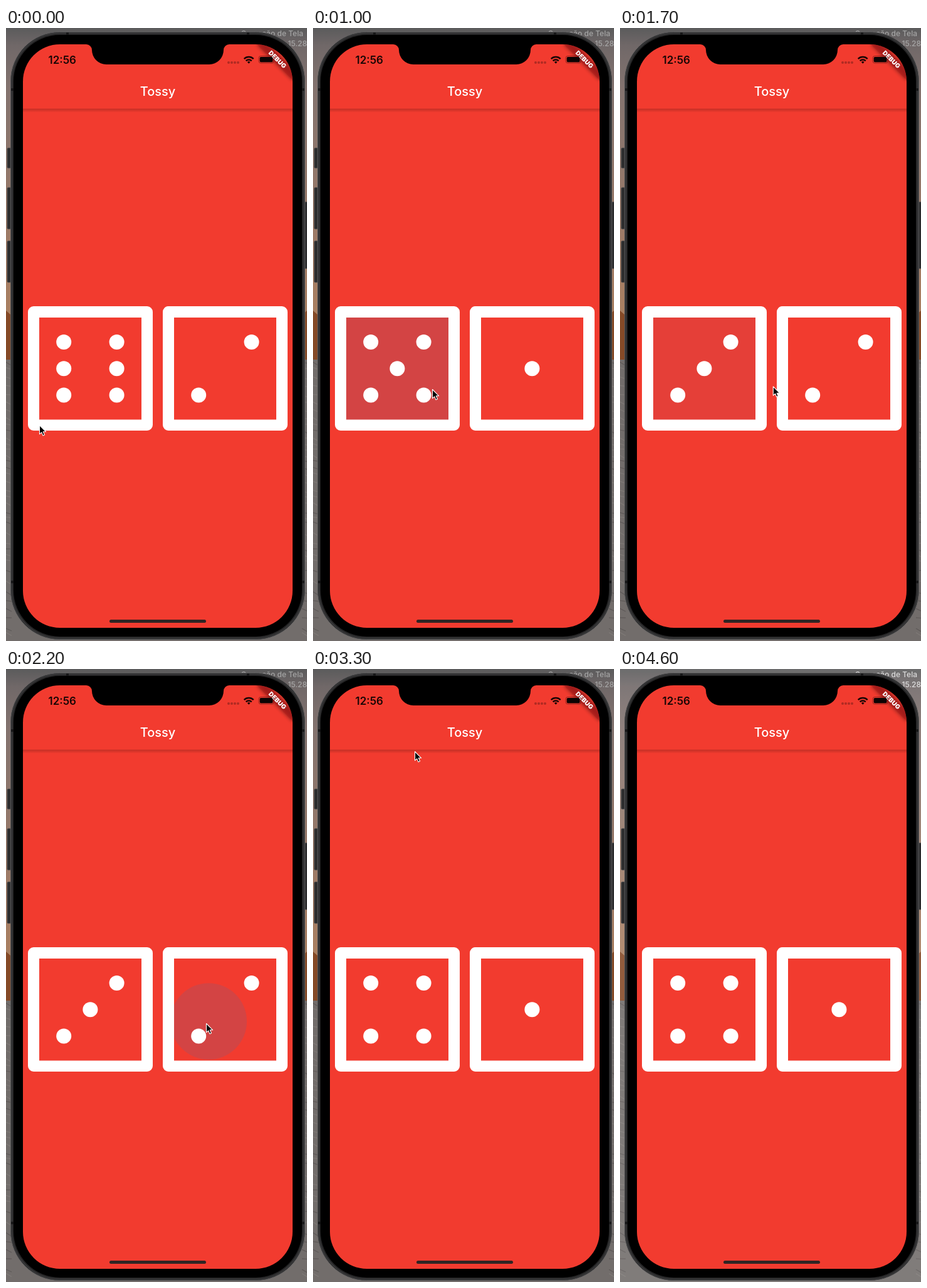
Recreate the animation shown at these times as an HTML page. Size 480 by 976 pixels, loop 4.7 s.

```html
<!DOCTYPE html>
<html lang="en">
<head>
<meta charset="utf-8">
<title>Dice app</title>
<style>
  html, body { margin: 0; width: 100%; height: 100%; overflow: hidden; background: #6b6563; }
  svg { display: block; width: 480px; height: 976px; }
  text { font-family: Inter, Roboto, sans-serif; }
</style>
</head>
<body>
<svg id="stage" viewBox="0 0 480 976" xmlns="http://www.w3.org/2000/svg">
  <defs>
    <linearGradient id="sky" x1="0" y1="0" x2="0" y2="1">
      <stop offset="0" stop-color="#5b5b5c"/>
      <stop offset=".06" stop-color="#706868"/>
      <stop offset=".2" stop-color="#83736f"/>
      <stop offset=".45" stop-color="#8f776c"/>
      <stop offset=".8" stop-color="#a27c65"/>
      <stop offset="1" stop-color="#aa8061"/>
    </linearGradient>
    <linearGradient id="barShade" x1="0" y1="0" x2="0" y2="1">
      <stop offset="0" stop-color="#000" stop-opacity=".2"/>
      <stop offset="1" stop-color="#000" stop-opacity="0"/>
    </linearGradient>
    <filter id="blur" x="-20%" y="-80%" width="140%" height="260%"><feGaussianBlur stdDeviation="3"/></filter>
    <clipPath id="screen"><rect x="27" y="26" width="430" height="929" rx="59"/></clipPath>
    <clipPath id="leftDie"><rect x="35" y="443" width="199" height="198" rx="9"/></clipPath>
    <clipPath id="rightDie"><rect x="250" y="443" width="199" height="198" rx="9"/></clipPath>
  </defs>

  <!-- desktop -->
  <rect width="480" height="460" fill="url(#sky)"/>
  <path d="M0 450L8 457V530H0zM480 450L472 457V530H480z" fill="#854a27"/>
  <rect y="528" width="480" height="448" fill="#726d6b"/>
  <g id="rock" stroke-width="1.2" fill="none"></g>
  <rect id="light" width="480" height="976" fill="#fff" opacity="0"/>
  <g id="label" fill="#a5a5a5" font-size="12" font-weight="500" text-anchor="end">
    <text x="474" y="13">Gravação de Tela</text>
    <text x="480" y="28.5">15.28</text>
  </g>

  <!-- phone body -->
  <g fill="#2d2d2e" stroke="#505051" stroke-width=".8">
    <rect x="2" y="191" width="8" height="32" rx="1.5"/>
    <rect x="2" y="254" width="8" height="66" rx="1.5"/>
    <rect x="2" y="339" width="8" height="66" rx="1.5"/>
    <rect x="475" y="277" width="7" height="106" rx="1.5"/>
  </g>
  <rect x="7.5" y="6.5" width="469" height="967" rx="78" fill="#262627" stroke="#59595a"/>
  <rect x="9.5" y="8.5" width="465" height="963" rx="76" fill="none" stroke="#3b3b3c" stroke-width="1.5"/>
  <path d="M8 98h4M472 98h4M8 882h4M472 882h4M98 7v4M386 7v4" stroke="#171718" stroke-width="4"/>
  <rect x="12" y="11" width="460" height="958" rx="74" fill="#000"/>

  <g clip-path="url(#screen)">
    <rect x="27" y="26" width="430" height="929" fill="#f23b2f"/>
    <rect x="27" y="128.5" width="430" height="6" fill="url(#barShade)"/>
    <text x="242" y="108" font-size="20" font-weight="500" fill="#fff" text-anchor="middle">Tossy</text>
    <circle id="ripple" fill="#217bc0"/>
    <g id="dice" fill="#fff"></g>
    <g transform="translate(457 26) rotate(45)">
      <rect x="-40" y="28" width="80" height="12" fill="#000" opacity=".5" filter="url(#blur)"/>
      <rect x="-40" y="28" width="80" height="12" fill="#b71c1c" opacity=".63"/>
      <text x="0" y="37.6" font-size="10" font-weight="900" fill="#fff" text-anchor="middle">DEBUG</text>
    </g>
    <rect x="165" y="942" width="154" height="5" rx="2.5" fill="#302524"/>
  </g>
  <path d="M128 25H356V26A9 9 0 0 0 347 35A23 23 0 0 1 324 58H160A23 23 0 0 1 137 35A9 9 0 0 0 128 26z" fill="#000"/>

  <!-- status bar -->
  <g fill="#1a0605">
    <text x="67.5" y="56.5" font-size="17" font-weight="600">12:56</text>
    <g opacity=".3">
      <circle cx="355" cy="55" r="2"/><circle cx="360" cy="55" r="2"/>
      <circle cx="365" cy="55" r="2"/><circle cx="370" cy="55" r="2"/>
    </g>
    <g fill="none" stroke="#1a0605" stroke-width="2.5">
      <path d="M379.7 49.2a10.6 10.6 0 0 1 15 0"/>
      <path d="M382.7 52.3a6.4 6.4 0 0 1 9 0"/>
    </g>
    <path d="M384.9 54.2a3.2 3.2 0 0 1 4.6 0L387.2 56.7z"/>
    <rect x="403" y="44.5" width="24" height="11.5" rx="3.4" fill="none" stroke="#1a0605" stroke-opacity=".4"/>
    <rect x="404.6" y="46" width="20.8" height="8.5" rx="2" fill="#0c0303"/>
  </g>

  <path id="cursor" d="M.5 .5V14.7L3.7 11.8 5.9 16.9 8.5 15.8 6.3 10.8H10.7z"
    fill="#000" stroke="#fff" stroke-width="1.1" stroke-linejoin="round"/>
</svg>

<script>
const LOOP = 4700, STEP = 100, FOCUS_AT = 4000;
const $ = id => document.getElementById(id);
const lerp = (a, b, k) => a + (b - a) * k;
const clamp = v => Math.max(0, Math.min(1, v));

// cubic-bezier(.25, .1, .25, 1)
function ease(x) {
  const bez = (a, b, u) => 3 * a * u * (1 - u) ** 2 + 3 * b * u * u * (1 - u) + u ** 3;
  let lo = 0, hi = 1;
  for (let i = 0; i < 24; i++) {
    const mid = (lo + hi) / 2;
    if (bez(.25, .25, mid) < x) lo = mid; else hi = mid;
  }
  return bez(.1, 1, lo);
}
const smooth = x => x * x * (3 - 2 * x);

// [time, x, y]
const path = [
  [0, 53, 632], [100, 53, 632], [600, 190, 575], [1500, 190, 575],
  [1950, 319, 564], [2850, 319, 564], [3300, 162, 131], [3500, 120, -30]
];
const left = { cx: 134.5, clip: "url(#leftDie)" };
const right = { cx: 349.5, clip: "url(#rightDie)" };
const taps = [
  { down: 630, up: 790, x: 190, y: 575, die: left },
  { down: 1280, up: 1390, x: 190, y: 575, die: left },
  { down: 2075, up: 2240, x: 319, y: 564, die: right },
  { down: 2652, up: 2698, x: 319, y: 564, die: right }
];
// [time, left face, right face]
const rolls = [[0, 6, 2], [790, 5, 1], [1390, 3, 2], [2240, 4, 3], [2698, 4, 1]];

// cells numbered 0 to 8, row by row
const faces = ["", "4", "26", "246", "0268", "02468", "035268"];
const SHIFT = 215;

function dieMarkup(face, dx) {
  const pips = [...faces[face]].map(c =>
    `<circle cx="${92.2 + c % 3 * 42.2}" cy="${500 + Math.floor(c / 3) * 42.2}" r="12"/>`).join("");
  return `<g transform="translate(${dx})">
    <path fill-rule="evenodd" d="M44 443H225a9 9 0 0 1 9 9V632a9 9 0 0 1-9 9H44a9 9 0 0 1-9-9V452a9 9 0 0 1 9-9zM53 461V623.5H216V461z"/>
    ${pips}</g>`;
}

function drawRipple(t) {
  const tap = taps.filter(k => t >= k.down).pop();
  if (!tap || t > tap.up + 375) return $("ripple").setAttribute("opacity", 0);
  const held = (Math.min(t, tap.up) - tap.down) / 1000;
  const freed = Math.max(0, t - tap.up);
  const k = ease(clamp(held + freed / 225));
  const alpha = clamp((t - tap.down) / 75) * (1 - clamp((freed - 225) / 150));
  const attrs = {
    cx: lerp(tap.x, tap.die.cx, k), cy: lerp(tap.y, 542, k),
    r: lerp(45.6, 157, k), opacity: .145 * alpha, "clip-path": tap.die.clip
  };
  for (const key in attrs) $("ripple").setAttribute(key, attrs[key]);
}

function drawCursor(t) {
  let i = path.findIndex(p => p[0] > t);
  if (i < 0) i = path.length - 1;
  const a = path[i - 1], b = path[i];
  const raw = clamp((t - a[0]) / (b[0] - a[0]));
  const k = i === path.length - 1 ? raw : smooth(raw);
  $("cursor").setAttribute("transform", `translate(${lerp(a[1], b[1], k)} ${lerp(a[2], b[2], k)})`);
}

let shown;
function draw(t) {
  const roll = rolls.filter(r => t >= r[0]).pop();
  if (roll !== shown) {
    $("dice").innerHTML = dieMarkup(roll[1], 0) + dieMarkup(roll[2], SHIFT);
    shown = roll;
  }
  const focus = t >= FOCUS_AT;
  $("light").setAttribute("opacity", focus ? .1 : 0);
  $("label").setAttribute("fill", focus ? "#dcdcdc" : "#a5a5a5");
  drawRipple(t);
  drawCursor(t);
}

function drawRock() {
  let seed = 7, out = "";
  const rnd = () => (seed = seed * 16807 % 2147483647) / 2147483647;
  for (let y = 532; y < 974; y += 6 + rnd() * 12) {
    const tone = rnd() < .5 ? "#5e5958" : "#7f7a77";
    out += `<path d="M0 ${y}l9 ${rnd() * 6}M472 ${y}l9 ${rnd() * 6}" stroke="${tone}"/>`;
  }
  $("rock").innerHTML = out;
}

function tick() {
  draw(Math.floor(performance.now() % LOOP / STEP) * STEP);
  requestAnimationFrame(tick);
}
drawRock();
tick();
</script>
</body>
</html>
```
